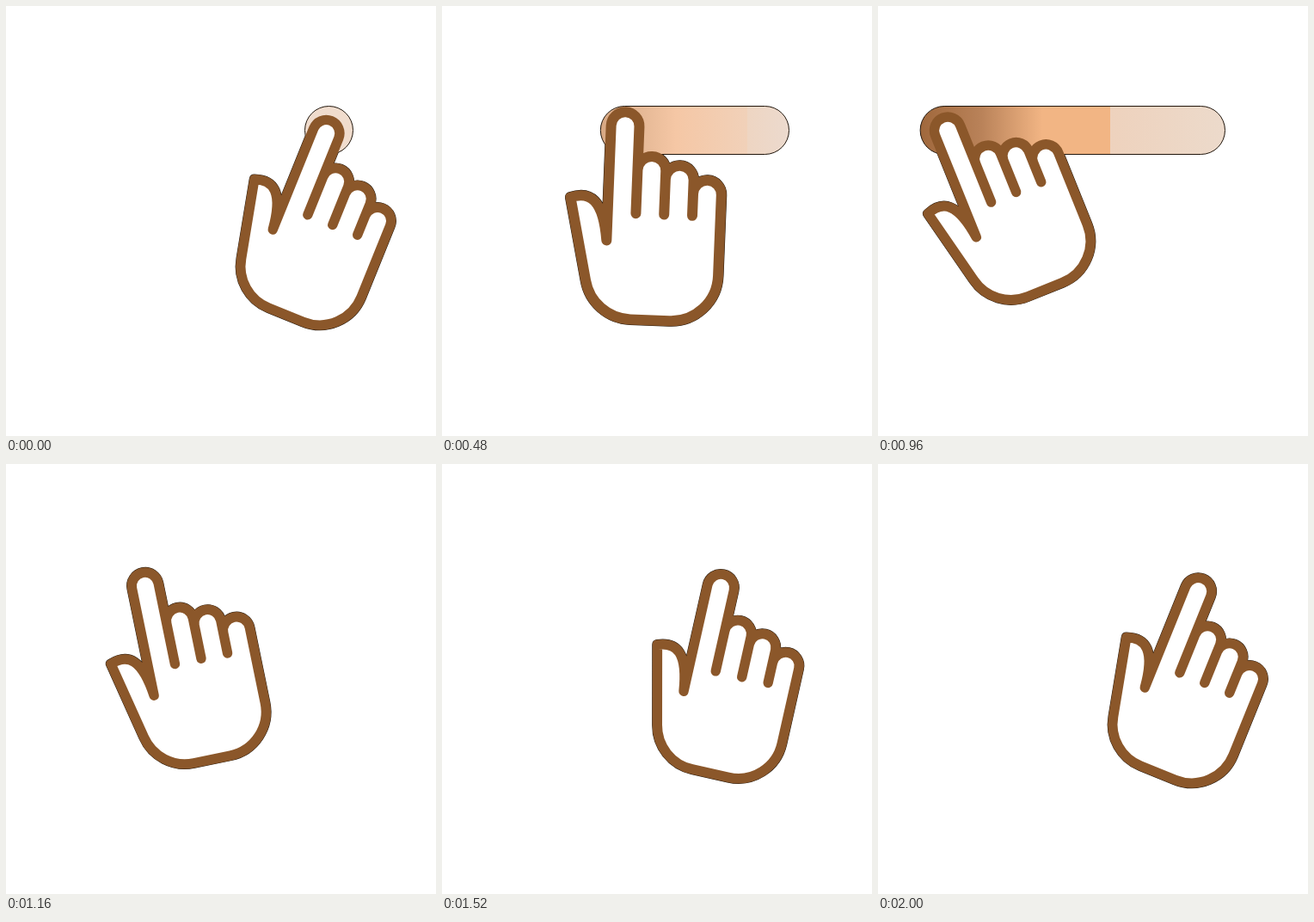
Write an HTML page with a canvas that moves like this. It is 500 by 500 pixels and loops after 2040 ms.

```html
<!DOCTYPE html>
<html lang="en">
<head>
<meta charset="utf-8">
<title>Swipe gesture</title>
<style>
html, body { margin: 0; width: 100%; height: 100%; overflow: hidden; background: #fff; }
canvas { display: block; width: 500px; height: 500px; }
</style>
</head>
<body>
<canvas id="stage" width="500" height="500"></canvas>
<script>
const ctx = document.getElementById('stage').getContext('2d');
const LOOP = 2040, STEP = 40, SWIPE = 980, BACK = 1020, TRAIL_END = 1000;
const BROWN = '#8b572a', EDGE = '#21160c';

// Hand outline; the origin is the centre of the index fingertip.
const cap = 'A15.6 15.6 0 0 1 ';
const hand = new Path2D(
  `M-15.6 127V0${cap}15.6 0V96V48${cap}46.8 48V96V57${cap}78 57V96V72${cap}109.2 72` +
  'V161.3A52 52 0 0 1 57.2 213.3H14A52 52 0 0 1 -36.9 172.1L-57.3 81C-36 73 -21 82 -15.6 127Z');

// Trail colours every 320 ms: place of the hard step, then colours from head to tail.
const tones = [
  { step: .9, colors: [0xf0dccd, 0xf0dccd, 0xf0dccd, 0xf0dccd, 0xf0dccd, 0xf0dccd] },
  { step: .85, colors: [0xf0cbb0, 0xf1cdb5, 0xf0d0bb, 0xedd5c4, 0xedd6c5, 0xecdacd] },
  { step: .705, colors: [0xc08555, 0xd6a072, 0xf9bd8e, 0xf5ccae, 0xeed3be, 0xebdace] },
  { step: .624, colors: [0xa0683c, 0xb98259, 0xf2b584, 0xf2b584, 0xeed2bd, 0xecdacb] }
];

const lerp = (a, b, k) => a + (b - a) * k;

function bezier(x1, y1, x2, y2) {
  const at = (s, a, b) => 3 * (1 - s) ** 2 * s * a + 3 * (1 - s) * s * s * b + s ** 3;
  return x => {
    if (x <= 0 || x >= 1) return x <= 0 ? 0 : 1;
    let lo = 0, hi = 1;
    for (let i = 0; i < 24; i++) {
      const mid = (lo + hi) / 2;
      if (at(mid, x1, x2) < x) lo = mid; else hi = mid;
    }
    return at(lo, y1, y2);
  };
}

const swipeMove = bezier(.54, 0, .38, 1), swipeTurn = bezier(.47, 0, .58, 1);
const backMove = bezier(.235, .17, .275, 1), backTurn = bezier(.17, 0, .34, 1);

function mix(a, b, k) {
  const part = shift => Math.round(lerp(a >> shift & 255, b >> shift & 255, k));
  return `rgb(${part(16)},${part(8)},${part(0)})`;
}

function trailFill(t, left, right) {
  const i = Math.min(2, Math.floor(t / 320)), k = Math.min(1, t / 320 - i);
  const from = tones[i], to = tones[i + 1];
  const step = lerp(from.step, to.step, k);
  const fill = ctx.createLinearGradient(left, 0, right, 0);
  [0, .2, .4, step, step, 1].forEach((stop, n) =>
    fill.addColorStop(stop, mix(from.colors[n], to.colors[n], k)));
  return fill;
}

function drawTrail(t, head) {
  const left = head - 28, right = 403.5;
  ctx.beginPath();
  ctx.arc(head, 144.5, 28, Math.PI / 2, Math.PI * 1.5);
  ctx.arc(375.5, 144.5, 28, -Math.PI / 2, Math.PI / 2);
  ctx.closePath();
  ctx.fillStyle = trailFill(t, left, right);
  ctx.fill();
  ctx.lineWidth = 1;
  ctx.strokeStyle = EDGE;
  ctx.stroke();
}

function pose(t) {
  const out = t < SWIPE, k = out ? t / SWIPE : (t - SWIPE) / BACK;
  const moved = out ? swipeMove(k) : 1 - backMove(k);
  const turned = out ? swipeTurn(k) : 1 - backTurn(k);
  const lift = out ? Math.sin(Math.PI * k) : 0;
  const angle = lerp(22, -22, turned) * Math.PI / 180;
  return {
    moved, angle,
    x: lerp(372.3, 81, moved),
    y: 141 + 74 * (1 - Math.cos(angle)) + 4.3 * Math.sin(angle) - 1.6 * lift,
    scale: 1 + .052 * lift
  };
}

function withHand(p, paint) {
  ctx.save();
  ctx.translate(p.x, p.y);
  ctx.rotate(p.angle);
  ctx.scale(p.scale, p.scale);
  ctx.lineJoin = ctx.lineCap = 'round';
  paint();
  ctx.restore();
}

function draw(now) {
  const t = Math.floor(now % LOOP / STEP) * STEP, p = pose(t);
  ctx.fillStyle = '#fff';
  ctx.fillRect(0, 0, 500, 500);
  // Thin dark rim, hidden wherever the trail lies behind the hand.
  withHand(p, () => {
    ctx.lineWidth = 12.3;
    ctx.strokeStyle = EDGE;
    ctx.stroke(hand);
  });
  if (t < TRAIL_END) drawTrail(t, lerp(375.5, 77, p.moved));
  withHand(p, () => {
    ctx.fillStyle = '#fff';
    ctx.fill(hand);
    ctx.lineWidth = 11.4;
    ctx.strokeStyle = BROWN;
    ctx.stroke(hand);
  });
}

const start = performance.now();
function tick() {
  draw(performance.now() - start);
  requestAnimationFrame(tick);
}
tick();
</script>
</body>
</html>
```
